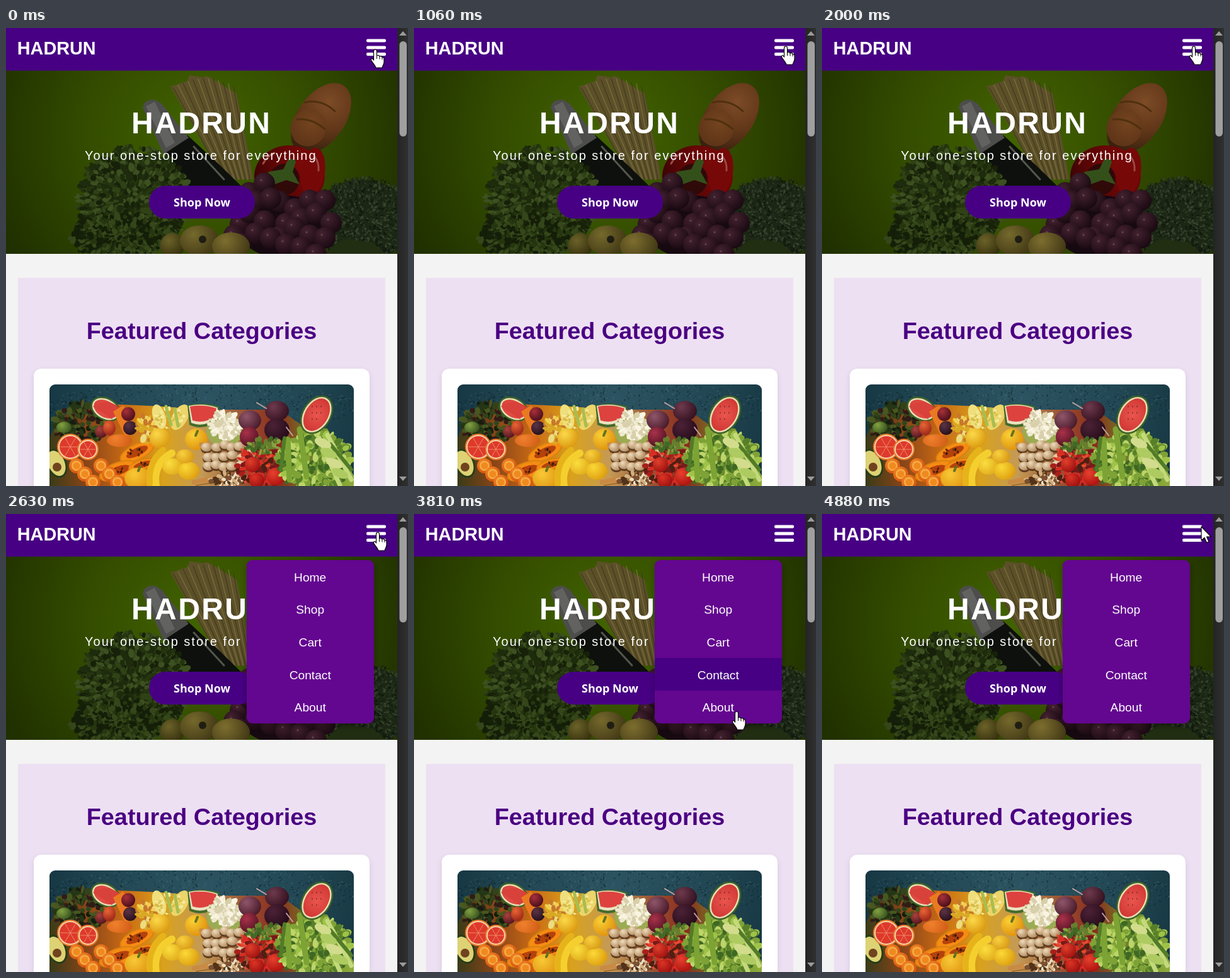
Recreate the animation shown at these times as an HTML page with a canvas. Size 638 by 726 pixels, loop 5000 ms.

```html
<!DOCTYPE html>
<html lang="en">
<head>
<meta charset="utf-8">
<title>Shop menu</title>
<style>
  html, body { margin: 0; width: 100%; height: 100%; overflow: hidden; background: #f3f3f3; }
  #stage { position: relative; width: 638px; height: 726px; overflow: hidden; }
  canvas, svg { position: absolute; left: 0; top: 0; display: block; }
  text { font-family: "Liberation Sans", Arial, sans-serif; fill: #fff; }
  .mid { text-anchor: middle; }
  .bold { font-weight: 700; }
  .brand { font-size: 28.8px; }
  .title { font-size: 48px; letter-spacing: 2.4px; }
  .tagline { font-size: 20px; letter-spacing: 2px; }
  .shop { font: 700 18px "Noto Sans", sans-serif; }
  .heading { font-size: 37.8px; fill: #4b0082; }
  .item { font-size: 19.2px; }
  .panel { filter: drop-shadow(0 4px 5px rgba(0, 0, 0, .3)); }
</style>
</head>
<body>
<div id="stage">
  <canvas id="art" width="638" height="726"></canvas>
  <svg width="638" height="726" viewBox="0 0 638 726">
    <rect width="621" height="67.5" fill="#470084"/>
    <text class="brand bold" x="17.8" y="42">HADRUN</text>
    <g fill="#fff">
      <rect x="572" y="17.5" width="31" height="5" rx="2"/>
      <rect x="572" y="28.5" width="31" height="5" rx="2"/>
      <rect x="572" y="39" width="31" height="5" rx="2"/>
    </g>
    <text class="title bold" x="199" y="167">HADRUN</text>
    <text class="tagline" x="125" y="208.500">Your one-stop store for everything</text>
    <rect x="227" y="250" width="168" height="52" rx="26" fill="#470084"/>
    <text class="shop mid" x="311" y="282.500">Shop Now</text>
    <text class="heading bold mid" x="310.5" y="493">Featured Categories</text>

    <linearGradient id="track"><stop stop-color="#242424"/><stop offset="1" stop-color="#303030"/></linearGradient>
    <rect x="621" width="17" height="726" fill="url(#track)"/>
    <rect x="624.5" y="21" width="11.5" height="151" rx="5.7" fill="#9f9f9f"/>
    <path d="M624 12l6-7 6 7zM624 711l6 7 6-7z" fill="#9a9a9a"/>

    <g id="menu">
      <rect class="panel" x="382" y="73" width="202" height="259" rx="9" fill="#630690"/>
      <rect id="glow" x="382" width="202" height="51.7" fill="#470084"/>
      <g id="items"></g>
    </g>
    <g id="cursor" fill="#fff" stroke="#000" stroke-width="1.2" stroke-linejoin="round">
      <g id="hand" transform="translate(0 -1)">
        <path d="M-2.5 3C-2.5-1 2.5-1 2.5 3V10C3.5 8.8 6.5 9 7 11C8.5 10 10.5 10.5 11 12.5C12.5 12 14 13 14 15V20C14 24 11.5 26 11 29H1C.5 26-4.5 21-6.5 17C-7.5 15-5 13.5-3.5 15.5L-2.5 17Z"/>
        <path d="M2.5 10v5M7 11v4.500M11 12.500v3.500" fill="none" stroke-width="1"/>
      </g>
      <path id="arrow" d="M0 0V22L5 17.5L8.5 25.5L12 24L8.5 16H15.5Z"/>
    </g>
  </svg>
</div>
<script>
const $ = id => document.getElementById(id);
const ctx = $('art').getContext('2d');

let seed = 7;
const rand = () => (seed = seed * 16807 % 2147483647) / 2147483647;

function oval(color, x, y, rx, ry = rx, turn = 0) {
  ctx.fillStyle = color;
  ctx.beginPath();
  ctx.ellipse(x, y, rx, ry, turn, 0, 7);
  ctx.fill();
}

function shape(color, d) {
  ctx.fillStyle = color;
  ctx.fill(new Path2D(d));
}

function line(color, width, d) {
  ctx.strokeStyle = color;
  ctx.lineWidth = width;
  ctx.lineCap = 'round';
  ctx.stroke(new Path2D(d));
}

// Fills an ellipse with small random spots.
function scatter(colors, n, x, y, rx, ry, size) {
  for (let i = 0; i < n; i++) {
    const a = rand() * 6.283, r = Math.sqrt(rand());
    const c = colors[Math.floor(rand() * colors.length)];
    oval(c, x + Math.cos(a) * r * rx, y + Math.sin(a) * r * ry,
      size * (.5 + rand()), size * (.4 + rand() * .6), a);
  }
}

function box(color, x, y, w, h, r = 0) {
  ctx.fillStyle = color;
  ctx.beginPath();
  ctx.roundRect(x, y, w, h, r);
  ctx.fill();
}

function inside(x, y, w, h, r, draw) {
  ctx.save();
  ctx.beginPath();
  ctx.roundRect(x, y, w, h, r);
  ctx.clip();
  draw();
  ctx.restore();
}

function stops(g, colors) {
  colors.forEach((c, i) => g.addColorStop(i / (colors.length - 1), c));
  return g;
}
const radial = (x, y, r, ...colors) => stops(ctx.createRadialGradient(x, y, 0, x, y, r), colors);
const across = (x0, x1, ...colors) => stops(ctx.createLinearGradient(x0, 0, x1, 0), colors);

function ball(light, dark, x, y, r, ry = r) {
  oval(radial(x - r * .3, y - ry * .4, r * 1.4, light, dark), x, y, r, ry);
}

function hero() {
  box(radial(310, 170, 350, '#426300', '#344d00', '#203000'), 0, 67, 621, 291);

  // pasta
  shape('#5c5029', 'M261 93L288 84L291 75L312 78L320 76L366 104L388 215L392 240H345Z');
  for (let i = 0; i < 13; i++)
    line(i % 2 ? '#7d7040' : '#423a1d', 1.2, `M${265 + i * 8} ${94 - 14 * Math.sin(i / 4)}L${345 + i * 3.5} 240`);

  // bread
  oval(radial(512, 118, 85, '#7d4b27', '#623819', '#38200e'), 500, 143, 38, 63, .62);
  oval(radial(485, 150, 45, '#74441f', '#5a3216'), 480, 158, 28, 30, .5);
  line('#50300f', 3, 'M474 118Q500 112 522 132M462 145Q484 142 506 160');

  // bottle
  shape('#0d100c', 'M246 190L288 170L340 218L385 262L335 290L290 250Z');
  shape('#4d4d4c', 'M217 126Q220 112 237 114L247 120L290 174L250 200L240 178Z');
  shape('#626261', 'M222 124L236 117L268 182L254 190Z');
  line('#54574c', 3, 'M298 188L346 240');

  // pepper
  oval(radial(480, 215, 95, '#800b09', '#640606', '#370405'), 450, 235, 56, 49);
  oval('#760808', 487, 228, 19, 38, .15);
  oval('#300909', 442, 240, 24, 25);
  shape('#34501a', 'M416 228L440 224L448 208Q458 206 460 212L455 228L466 248L445 241L420 250Z');
  line('#9a4a40', 3, 'M408 215Q414 203 426 198M490 204Q497 214 496 226');

  // lettuce
  oval('#1c280d', 205, 280, 82, 82);
  oval('#18230c', 165, 325, 58, 40);
  scatter(['#2f4116', '#25350f', '#172109', '#3d5020', '#1e2c0d'], 900, 203, 272, 90, 84, 5);
  scatter(['#141e08', '#26360f', '#35471a'], 320, 185, 330, 82, 36, 4.5);

  // broccoli
  oval('#1b2614', 565, 305, 78, 65);
  scatter(['#27341f', '#1c2716', '#36432d', '#121a0e'], 1500, 567, 302, 82, 66, 2);
  shape('#222e12', 'M505 358L535 334L582 340L602 358Z');

  // grapes
  oval('#160910', 440, 315, 72, 50);
  for (let i = 0; i < 27; i++) {
    const row = Math.floor(i / 7), x = 362 + (i % 7) * 24 + (row % 2) * 10;
    const y = 278 + row * 24 + Math.sin(i * 2) * 9 - (x > 385 && x < 425 ? 25 : 0);
    ball('#43222f', '#1b0a13', x, y, 17);
    oval('#5e4854', x - 5, y - 5, 1.5);
  }

  // pears
  ball('#6b6228', '#38320f', 264, 345, 19, 20);
  ball('#75692c', '#3d3413', 307, 337, 31, 24);
  ball('#7d6e2e', '#403715', 357, 346, 30, 22);
  oval('#201e12', 312, 335, 6);
}

function melon(x, y, rx, ry, turn) {
  oval('#3f6428', x, y, rx, ry, turn);
  oval('#e9dfb6', x, y, rx - 2.5, ry - 2.5, turn);
  oval(radial(x, y, rx * 1.3, '#e9564e', '#cf3532'), x, y, rx - 5, ry - 5, turn);
}

function halved(x, y, r) {
  oval('#e8792a', x, y, r);
  oval('#f4d3a8', x, y, r - 2);
  oval('#de3a2b', x, y, r - 4);
  for (let i = 0; i < 6; i++)
    line('#f08969', 1, `M${x} ${y}l${(r - 5) * Math.cos(i * 1.05)} ${(r - 5) * Math.sin(i * 1.05)}`);
}

function papaya(x, y, rx, ry, turn) {
  oval('#d9820f', x, y, rx, ry, turn);
  oval('#f58c14', x, y, rx - 2, ry - 2, turn);
  oval('#b5420b', x, y, rx * .62, ry * .5, turn);
  scatter(['#3c1b0c', '#7a2c0a'], 10, x, y, rx * .5, ry * .35, 2);
}

function produce() {
  box(radial(320, 590, 320, '#2c5361', '#214652', '#0f2d38'), 69, 565, 483, 161);
  scatter(['rgba(8,28,36,.4)', 'rgba(80,125,140,.25)'], 900, 310, 600, 250, 40, 1.5);
  shape(across(69, 552, '#3a3b18', '#8a4518', '#c96a14', '#d9a21c', '#c49a55', '#9c5a38', '#8a2a1c', '#6d8c2a', '#8fae3c'),
    'M69 650Q90 590 165 596L250 600L310 605L435 605L470 630L510 635L552 710V726H69Z');

  // dark leaves and left fruit
  scatter(['#253616', '#34421a', '#331b17', '#151e0d', '#48571f'], 190, 116, 628, 40, 34, 5);
  ball('#82a142', '#354f1d', 92, 633, 12, 9);
  melon(158, 604, 25, 18, .5);
  shape('#d8423a', 'M138 600Q160 584 180 602L168 620Z');
  oval('#263d17', 80, 690, 16, 24, -.4);
  oval('#ddd274', 80, 690, 13, 21, -.4);
  oval('#70431f', 81, 696, 7);
  halved(102, 664, 21);
  halved(130, 668, 17);
  ball('#a9433d', '#571720', 151, 640, 10);
  ball('#e96534', '#a52f1c', 164, 634, 10, 12);
  shape('#ea7a20', 'M170 608L186 598L206 634L190 649Z');
  ball('#a8303a', '#4d101c', 194, 612, 11);
  ball('#5c3444', '#29121f', 197, 634, 11);
  ball('#f0812e', '#cf5a14', 180, 654, 20, 10);

  // papaya and citrus
  papaya(208, 672, 30, 13, -.45);
  papaya(178, 702, 32, 14, -.35);
  papaya(217, 692, 24, 9, -.3);
  for (let i = 0; i < 6; i++) {
    const x = 112 + i * 13, y = 694 + (i % 3) * 13;
    ball('#f28a26', '#d5560f', x, y, 12);
    oval('#f7ac48', x, y, 8);
    oval('#ef8a1e', x, y, 5.5);
  }

  // corn, peppers, bananas and lemons
  scatter(['#f3cf4e', '#d9a824', '#ecdc80', '#c7782a'], 50, 222, 634, 16, 20, 5);
  ball('#fbd94a', '#dd9c12', 244, 650, 16);
  ball('#f8c936', '#df900f', 210, 714, 22, 17);
  ball('#fbcf35', '#de930f', 302, 652, 18, 17);
  line('#64731f', 4, 'M210 702l3-7M301 646l3-7');
  oval('#efdf7c', 243, 616, 10, 20, -.3);
  oval('#ecd56a', 276, 617, 12, 22, .5);
  scatter(['#f6eaa0', '#d9bd48'], 40, 260, 618, 24, 16, 2.5);
  line('#a9bd50', 5, 'M254 600L262 629M268 604L273 631');
  line('#f4cf2e', 12, 'M263 674Q232 691 238 726');
  line('#e6b41a', 10, 'M249 669Q225 689 228 722');
  ball('#fbdf3e', '#dfa81a', 264, 695, 16, 13);
  ball('#fbd836', '#dc9b0e', 290, 702, 17, 14);
  ball('#f8d040', '#d79812', 284, 679, 14, 11);
  line('#c98a44', 7, 'M310 660L324 700M298 720L340 712');
  line('#a86a2c', 2, 'M316 662L330 700M302 725L346 718');

  // melon wedge, cauliflower and mushrooms
  shape('#456b2a', 'M288 598Q312 592 338 600L337 621Q315 640 291 629Z');
  shape('#ebe2c1', 'M290 599Q313 594 336 602L334 618Q315 634 294 626Z');
  shape('#dd423f', 'M292 600Q314 596 334 603L331 616Q314 628 296 622Z');
  oval('#9cab52', 347, 638, 29, 27);
  scatter(['#efe9d2', '#d8cfab', '#faf5e2'], 150, 348, 630, 24, 23, 4);
  for (let i = 0; i < 18; i++) {
    const x = 318 + (i % 6) * 13 + rand() * 5, y = 660 + Math.floor(i / 6) * 15 + rand() * 7;
    oval('#5e3d20', x, y + 3, 9, 7);
    ball('#efdcbb', '#a67c50', x, y, 9, 7);
  }
  scatter(['#7a5030', '#d3b080', '#ece0c4', '#4f3219'], 60, 353, 716, 33, 11, 4);

  // red vegetables
  ball('#90566a', '#481a2a', 387, 622, 18, 16);
  ball('#6e3a4c', '#32101f', 430, 607, 19, 16);
  ball('#4c2236', '#260b1a', 430, 637, 20, 18);
  ball('#a8324a', '#5a1428', 386, 648, 15, 16);
  line('#bfa4a1', 2, 'M413 603L398 594M445 633L455 646');
  scatter(['#d82d22', '#a91f19', '#e34b32', '#76191a', '#4e2012'], 130, 407, 693, 40, 33, 5);
  ball('#e0402c', '#a41411', 391, 692, 12);
  ball('#e8402e', '#b01611', 428, 711, 14);
  ball('#dd3324', '#9c1210', 398, 717, 12);
  scatter(['#426925', '#667f2e', '#8aa13f'], 50, 410, 662, 27, 12, 4);

  // greens
  scatter(['#7fa237', '#9fc348', '#58802a', '#bdd46b', '#3e6823'], 380, 490, 688, 58, 48, 6);
  line('#7ca334', 9, 'M447 652L450 716M466 636L477 711');
  line('#c4d97c', 7, 'M497 650L530 725M510 645L548 716');
  line('#527b27', 6, 'M442 650L436 700M515 660L548 700');
  for (let i = 0; i < 4; i++) oval(i % 2 ? '#aecb62' : '#d3dc8d', 503 + i * 9, 658 + i * 16, 14, 7, .4);
  melon(493, 613, 23, 33, .55);
  for (let i = 0; i < 8; i++)
    oval('#8a2a2c', 486 + (i % 3) * 7, 600 + Math.floor(i / 3) * 10, .8, 1.4);
}

function page() {
  box('#f3f3f3', 0, 0, 621, 726);
  inside(0, 67, 621, 291, 0, hero);
  box('#eee0f3', 19, 396, 583, 330);
  ctx.shadowColor = 'rgba(0,0,0,.1)';
  ctx.shadowBlur = 10;
  ctx.shadowOffsetY = 3;
  box('#fff', 44, 540, 533, 220, 12);
  ctx.shadowColor = 'transparent';
  inside(69, 565, 483, 200, 9, produce);
}

const ROW = 51.7, TOP = 73, STEP = 62.5, LOOP = 5000;
const route = [
  [0, 586, 35], [62.5, 586, 35], [437.5, 590, 30], [2937.5, 590, 30],
  [3125, 576, 40], [3500, 580, 36], [3812.5, 512, 314], [3937.5, 506, 318],
  [4125, 515, 302], [4562.5, 602, 20], [LOOP, 602, 20]
];

$('items').innerHTML = ['Home', 'Shop', 'Cart', 'Contact', 'About']
  .map((s, i) => `<text class="item mid" x="482.7" y="${TOP + 33.5 + i * ROW}">${s}</text>`).join('');

function locate(t) {
  const i = Math.max(1, route.findIndex(p => p[0] >= t));
  const [t0, x0, y0] = route[i - 1], [t1, x1, y1] = route[i];
  const k = Math.max(0, (t - t0) / (t1 - t0));
  return [x0 + (x1 - x0) * k, y0 + (y1 - y0) * k];
}

const isOpen = t => (t >= 1500 && t < 1930) || t >= 2500;

function rowAt([x, y]) {
  const row = Math.floor((y - TOP) / ROW);
  return x > 382 && x < 584 && row >= 0 && row < 5 ? row : -1;
}

function show(t) {
  const open = isOpen(t), [x, y] = locate(t);
  const lit = open ? rowAt(locate(t - STEP)) : -1; // hover trails the pointer by one step
  const onButton = x > 568 && x < 601 && y > 14 && y < 48;
  const hand = onButton || (open && rowAt([x, y]) >= 0);
  $('menu').style.display = open ? '' : 'none';
  $('glow').style.display = lit < 0 ? 'none' : '';
  $('glow').setAttribute('y', TOP + lit * ROW);
  $('hand').style.display = hand ? '' : 'none';
  $('arrow').style.display = hand ? 'none' : '';
  $('cursor').setAttribute('transform', `translate(${x} ${y})`);
}

const start = performance.now();
function tick() {
  const t = (performance.now() - start) % LOOP;
  show(Math.min(78, Math.floor((t + 3) / STEP)) * STEP);
  requestAnimationFrame(tick);
}
page();
tick();
</script>
</body>
</html>
```
